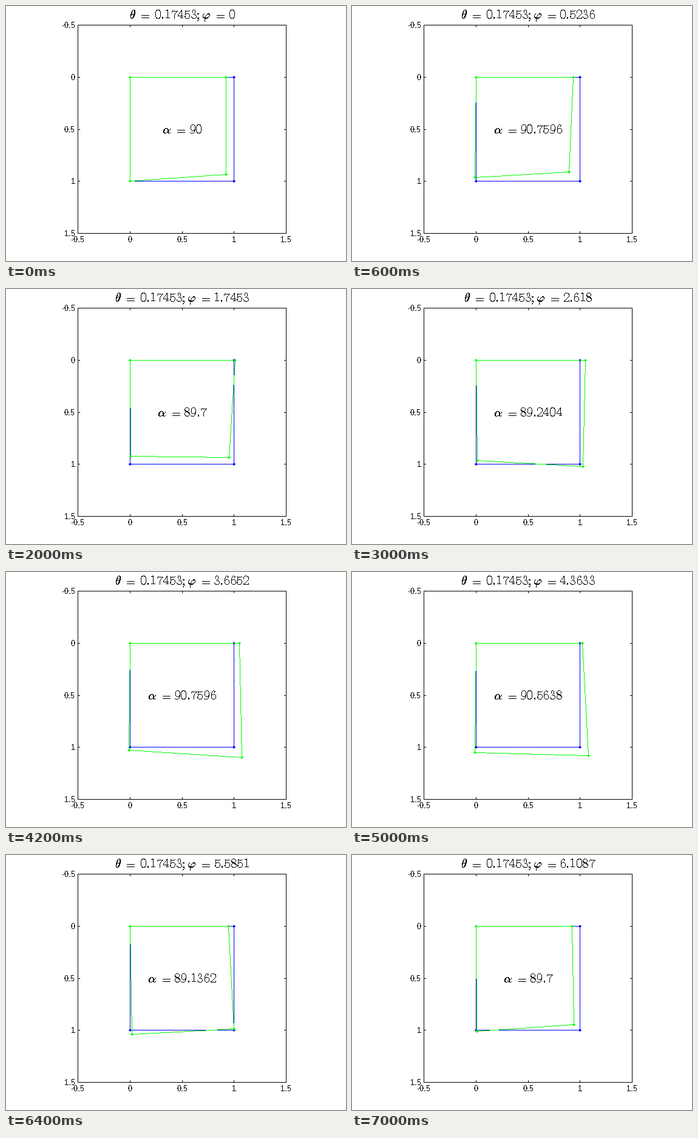
A matplotlib script for the animation above (7.2 s loop, 560x420 px).

```python
import numpy as np
import matplotlib.pyplot as plt
from matplotlib.animation import FuncAnimation

W, H, DPI = 560, 420, 100
PX = 72 / DPI                      # one pixel in points
FRAMES, INTERVAL = 36, 200

X0, Y0, UNIT = 204.2, 117.075, 171.15   # data origin and scale in pixels
LEFT, TOP, RIGHT, BOTTOM = 118, 31, 461, 374
CENTER = X0 + UNIT / 2
EM = 64 / 3                        # formula font size in pixels
TILT = np.radians(10)
DEPTH = 2.59                       # viewing distance
GREEK = {r"\theta": 0.532, r"\varphi": 0.746, r"\alpha": 0.739}

BLACK, BLUE, GREEN = (0, 0, 0), (0, 0, 255), (0, 255, 0)

plt.rcParams["mathtext.fontset"] = "cm"
plt.rcParams["text.hinting"] = "default"
plt.rcParams["text.hinting_factor"] = 1

fig = plt.figure(figsize=(W / DPI, H / DPI), dpi=DPI, facecolor="white")
ax = fig.add_axes([0, 0, 1, 1])
ax.axis("off")


def nearest(values):
    return np.floor(np.asarray(values) + 0.5).astype(int)


def to_pixels(points):
    return nearest(np.asarray(points) * UNIT + (X0, Y0))


def draw_line(canvas, start, end, color):
    """Hard-edged line, one pixel wide."""
    steps = max(abs(np.subtract(end, start)))
    x, y = nearest(np.linspace(start, end, steps + 1)).T
    canvas[y, x] = color


def draw_dot(canvas, center, color):
    x, y = center
    for dy in range(-2, 3):
        reach = 2 - abs(dy)
        canvas[y + dy, x - reach:x + reach + 1] = color


def draw_quad(canvas, points, color):
    corners = to_pixels(points)
    for start, end in zip(corners, np.roll(corners, -1, axis=0)):
        draw_line(canvas, start, end, color)
    for corner in corners:
        draw_dot(canvas, corner, color)


def draw_axes(canvas):
    """Frame with inward ticks on all four sides, labels left and below."""
    for x in (LEFT, RIGHT):
        draw_line(canvas, (x, TOP), (x, BOTTOM), BLACK)
    for y in (TOP, BOTTOM):
        draw_line(canvas, (LEFT, y), (RIGHT, y), BLACK)
    style = dict(fontfamily="Liberation Sans", fontsize=13 * PX,
                 va="baseline", antialiased=False)
    for value in (-0.5, 0, 0.5, 1, 1.5):
        x, y = np.clip(to_pixels((value, value)), (LEFT, TOP), (RIGHT, BOTTOM))
        if value == -0.5:
            x, y = LEFT, TOP
        for edge, inward in ((TOP, 3), (BOTTOM, -3)):
            draw_line(canvas, (x, edge), (x, edge + inward), BLACK)
        for edge, inward in ((LEFT, 3), (RIGHT, -3)):
            draw_line(canvas, (edge, y), (edge + inward, y), BLACK)
        ax.text(x + 0.5, 389, f"{value:g}", ha="center", **style)
        ax.text(114, y + 5, f"{value:g}", ha="right", **style)


class Formula:
    """One centred line of math with TeX spacing."""

    def __init__(self, count, baseline):
        self.slots = [ax.text(0, baseline, "", fontsize=EM * PX, ha="center",
                              va="baseline", antialiased=False)
                      for _ in range(count)]

    @staticmethod
    def advance(token):
        if token in GREEK:
            return GREEK[token]
        if token == "=":
            return 0.778 + 2 * 0.278
        width = sum(0.278 if c in ".;" else 0.5 for c in token)
        return width + (0.167 if token.endswith(";") else 0)

    def write(self, *tokens):
        widths = [EM * self.advance(t) for t in tokens]
        x = CENTER - sum(widths) / 2
        for slot, token, width in zip(self.slots, tokens, widths):
            slot.set_text(f"${token}$")
            slot.set_x(x + width / 2)
            x += width


def tilted_square(phi):
    """Unit square tilted towards phi, seen in perspective, and its corner angle."""
    c, s = np.cos(phi), np.sin(phi)
    k = np.sin(TILT) ** 2
    len_u, len_v = np.sqrt(1 - k * c * c), np.sqrt(1 - k * s * s)
    angle = np.arccos(-k * s * c / (len_u * len_v))
    u = np.array([len_u, 0])
    v = len_v * np.array([np.cos(angle), np.sin(angle)])

    def view(point, depth):
        return point / (1 + np.sin(TILT) * depth / DEPTH)

    return [(0, 0), view(u, c), view(u + v, c + s), view(v, s)], np.degrees(angle)


backdrop = np.full((H, W, 3), 255, dtype=np.uint8)
draw_axes(backdrop)
draw_quad(backdrop, [(0, 0), (1, 0), (1, 1), (0, 1)], BLUE)
picture = ax.imshow(backdrop, extent=(0, W, H, 0), aspect="auto",
                    interpolation="nearest")
title = Formula(6, 21)
label = Formula(3, 210)


def update(i):
    phi = np.radians(10 * i)
    corners, angle = tilted_square(phi)
    canvas = backdrop.copy()
    draw_quad(canvas, corners, GREEN)
    picture.set_data(canvas)
    title.write(r"\theta", "=", f"{TILT:.5g};", r"\varphi", "=", f"{phi:.5g}")
    label.write(r"\alpha", "=", f"{angle:.6g}")
    return []


anim = FuncAnimation(fig, update, frames=FRAMES, interval=INTERVAL,
                     init_func=lambda: [], repeat=True, repeat_delay=0)
plt.show()
```
